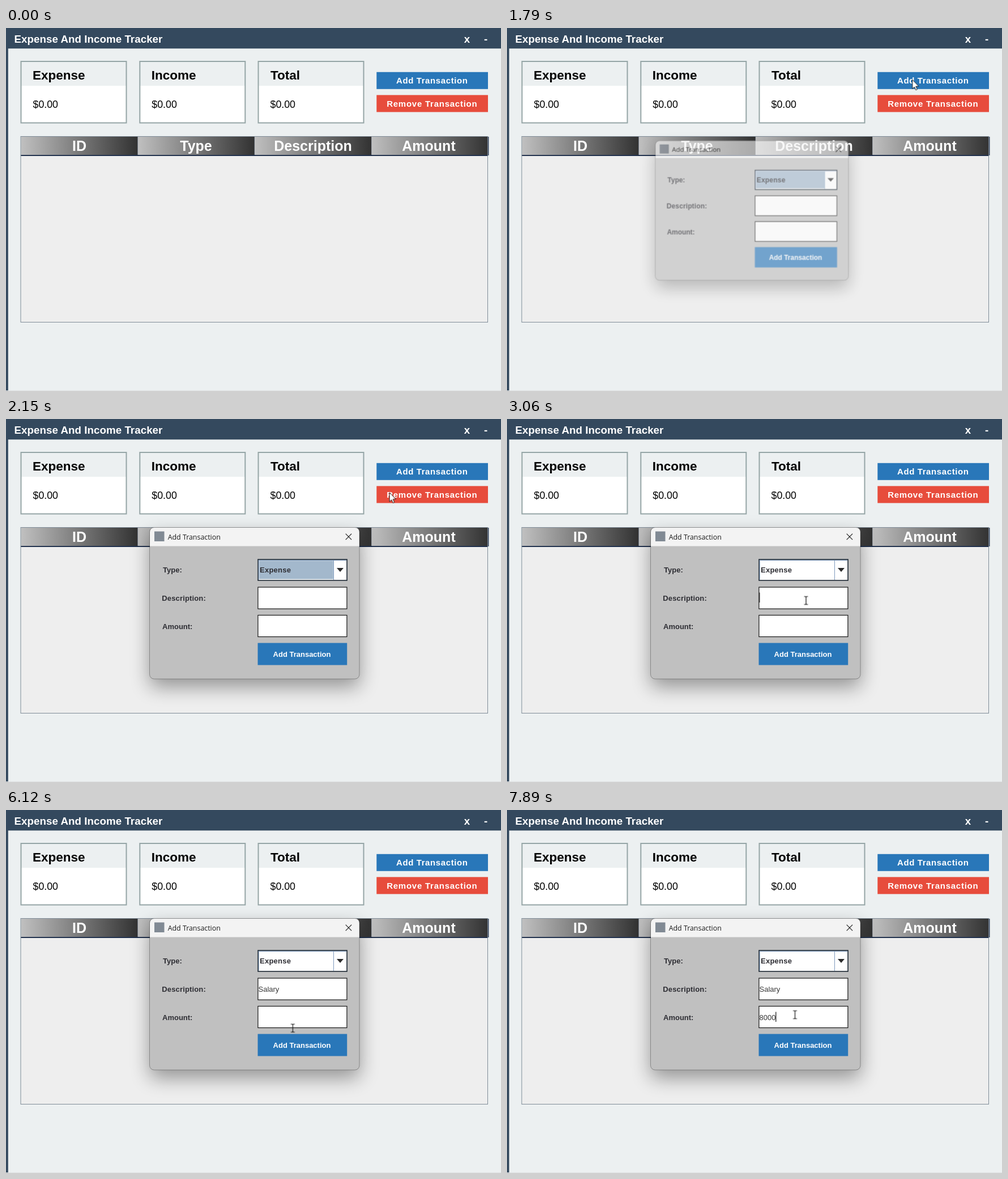
An HTML page that plays this animation: 874x641 px, repeating every 8 s.

```html
<!DOCTYPE html>
<html lang="en">
<head>
<meta charset="utf-8">
<title>Expense And Income Tracker</title>
<style>
html, body { margin: 0; width: 100%; height: 100%; overflow: hidden; background: #ecf0f1; }
svg { display: block; width: 874px; height: 641px; font-family: "Liberation Sans", Arial, sans-serif; }
text { white-space: pre; }
.bold { font-weight: bold; }
.mid { text-anchor: middle; }
.white { fill: #fff; }
.h1 { font-size: 18.75px; }
.h2 { font-size: 22.5px; }
.sum { font-size: 17.8px; }
.head { font-size: 25px; }
.btn { font-size: 15px; letter-spacing: .6px; }
.small { font-size: 13px; }
.label { fill: #2d2d33; }
.field { fill: #fff; stroke: #151515; stroke-width: 1.2; }
.typed { fill: #383838; }
.caret { fill: #222; }

/* every part shares one 8 s loop */
.loop { animation: 8s linear infinite; }
.step { animation: 8s step-end infinite; }

#dialog { animation-name: open; transform-origin: 357px 287px; }
#combo { animation-name: blur; }
#cursor { animation-name: move; }
#arrow { animation-name: arrow; }
#hand { animation-name: hand; }
#beam { animation-name: beam; }
#descClip { animation-name: typeDesc; }
#descCaret { animation-name: typeDesc, blinkDesc; }
#sumClip { animation-name: typeSum; }
#sumCaret { animation-name: typeSum, blinkSum; }

@keyframes open {
  0%, 21.1% { opacity: 0; transform: scale(.85); }
  23% { opacity: .93; transform: scale(.954); }
  24.9%, 100% { opacity: 1; transform: none; }
}
@keyframes blur {
  0% { fill: #a3b8cc; }
  36.75% { fill: #fff; }
}
@keyframes move {
  0%, 3.125% { transform: translate(838px, 611px); animation-timing-function: cubic-bezier(.3, .2, .4, 1); }
  9.25%, 11.6% { transform: translate(725px, 98px); }
  12.375%, 23.4% { transform: translate(715.5px, 91px); }
  26.875% { transform: translate(677.5px, 129px); }
  30%, 31% { transform: translate(516px, 256px); }
  32.375%, 36.7% { transform: translate(527px, 320.5px); }
  36.75%, 41.2% { transform: translate(528px, 320.5px); }
  41.25%, 76.35% { transform: translate(529.5px, 320.5px); }
  76.5% { transform: translate(506.5px, 385px); }
  79.1% { transform: translate(480px, 422px); }
  82%, 100% { transform: translate(508.5px, 361.5px); }
}
@keyframes arrow {
  0% { opacity: 0; }
  3.125% { opacity: 1; }
  8.4% { opacity: 0; }
  20.125% { opacity: 1; }
  31.8% { opacity: 0; }
  76.9% { opacity: 1; }
  80.9% { opacity: 0; }
}
@keyframes hand {
  0% { opacity: 0; }
  8.4% { opacity: 1; }
  20.125% { opacity: 0; }
}
@keyframes beam {
  0% { opacity: 0; }
  31.8% { opacity: 1; }
  76.9% { opacity: 0; }
  80.9% { opacity: 1; }
}
@keyframes typeDesc {
  0% { transform: none; }
  49.5% { transform: translateX(8.7px); }
  55.125% { transform: translateX(15.9px); }
  57% { transform: translateX(18.8px); }
  59.5% { transform: translateX(26px); }
  62% { transform: translateX(30.4px); }
  67.5% { transform: translateX(36.9px); }
}
@keyframes blinkDesc {
  0% { opacity: 0; }
  36.75% { opacity: 1; }
  43.125% { opacity: 0; }
  49.5% { opacity: 1; }
  73.5% { opacity: 0; }
  79.75% { opacity: 1; }
  84.5% { opacity: 0; }
}
@keyframes typeSum {
  0% { transform: none; }
  91.75% { transform: translateX(7.2px); }
  94.25% { transform: translateX(14.5px); }
  96.125% { transform: translateX(21.7px); }
  98.625% { transform: translateX(28.9px); }
}
@keyframes blinkSum {
  0% { opacity: 0; }
  84.5% { opacity: 1; }
  90.5% { opacity: 0; }
  91.75% { opacity: 1; }
}
</style>
</head>
<body>
<svg viewBox="0 0 874 641">
  <defs>
    <linearGradient id="steel">
      <stop offset="0" stop-color="#c0c0c0"/>
      <stop offset="1" stop-color="#323232"/>
    </linearGradient>
    <filter id="soft" x="-30%" y="-30%" width="160%" height="170%">
      <feGaussianBlur stdDeviation="17"/>
    </filter>
    <g id="card">
      <rect x="1" y="59" width="186" height="108.5" fill="#fff"/>
      <rect x="1" y="59" width="186" height="43" fill="#ecf0f1"/>
      <rect x="1" y="59" width="186" height="108.5" fill="none" stroke="#95a5a6" stroke-width="2"/>
    </g>
    <g id="cell">
      <rect y="192" width="206" height="32.5" fill="url(#steel)"/>
      <rect x="206" y="192" width="1.2" height="33" fill="#0f2140"/>
    </g>
    <clipPath id="descMask"><rect id="descClip" class="step" x="345.5" y="300" width="100" height="32"/></clipPath>
    <clipPath id="sumMask"><rect id="sumClip" class="step" x="345.5" y="350" width="100" height="32"/></clipPath>
  </defs>

  <!-- main window -->
  <rect width="874" height="641" fill="#ecf0f1"/>
  <rect y="640" width="874" height="1" fill="#dde0e1"/>
  <path d="M0 0H874V36.3H3.8V640H0Z" fill="#34495e"/>
  <g class="bold white h1">
    <text x="14.5" y="26" letter-spacing=".04">Expense And Income Tracker</text>
    <text x="808.7" y="26">x</text>
    <text x="844" y="26">-</text>
  </g>

  <use href="#card" x="25.5"/>
  <use href="#card" x="235.3"/>
  <use href="#card" x="444.5"/>
  <g class="bold h2">
    <text x="47" y="91">Expense</text>
    <text x="256.8" y="91">Income</text>
    <text x="467" y="91">Total</text>
  </g>
  <g class="sum">
    <text x="47.5" y="141">$0.00</text>
    <text x="257.3" y="141">$0.00</text>
    <text x="466.5" y="141">$0.00</text>
  </g>

  <rect x="654.3" y="77.8" width="196.7" height="30" fill="#2977b9"/>
  <rect x="654.3" y="118.4" width="196.7" height="30" fill="#e74c3c"/>
  <g class="bold white btn">
    <text x="689" y="98">Add Transaction</text>
    <text x="672.2" y="138.5" letter-spacing=".75" style="letter-spacing:.75px">Remove Transaction</text>
  </g>

  <!-- table -->
  <rect x="26" y="191.5" width="824.5" height="328" fill="#eee"/>
  <use href="#cell" x="26.5"/>
  <use href="#cell" x="232.7"/>
  <use href="#cell" x="439"/>
  <use href="#cell" x="645.2"/>
  <rect x="26" y="224.2" width="825" height="1.8" fill="#0f2140"/>
  <rect x="26" y="191.5" width="824.5" height="328" fill="none" stroke="#7f8b97"/>
  <g class="bold white mid head">
    <text x="129.5" y="216.5">ID</text>
    <text x="335.5" y="216.5">Type</text>
    <text x="542" y="216.5">Description</text>
    <text x="746.5" y="216.5">Amount</text>
  </g>

  <!-- dialog -->
  <g id="dialog" class="loop">
    <rect x="254" y="206" width="370" height="267" rx="8" opacity=".38" filter="url(#soft)"/>
    <rect x="254" y="191.5" width="370" height="267.5" rx="8" fill="#c0c0c0"/>
    <path d="M254 224.5V199.5a8 8 0 0 1 8-8H616a8 8 0 0 1 8 8V224.5Z" fill="#f3f3f3"/>
    <rect x="253.5" y="191.5" width="370.5" height="267.5" rx="8" fill="none" stroke="#000" stroke-opacity=".3"/>
    <rect x="262" y="198.5" width="17.5" height="17.5" fill="#818a94"/>
    <text x="285.7" y="213" fill="#1b1b1b" font-size="12.4" style="font-family:'Open Sans','Noto Sans',sans-serif">Add Transaction</text>
    <path d="M599.7 202.7l10.4 10.4m0-10.4l-10.4 10.4" stroke="#222" stroke-width="1.2"/>

    <g class="bold small label">
      <text x="277" y="271">Type:</text>
      <text x="275.3" y="321.3" letter-spacing=".15">Description:</text>
      <text x="276" y="370.7">Amount:</text>
    </g>

    <rect x="445" y="248" width="157" height="37" fill="#fff" stroke="#1b2631" stroke-width="1.6"/>
    <rect id="combo" class="step" x="447.3" y="250.3" width="130.5" height="32.4"/>
    <path d="M446.3 283.5V249.5H600.8M578.5 250V284" fill="none" stroke="#7f9bbd"/>
    <path d="M584 263H596L590 270Z" fill="#2b2b2b"/>
    <text class="bold small label" x="448" y="271" letter-spacing=".25">Expense</text>

    <rect class="field" x="444.9" y="297" width="157" height="38.2"/>
    <rect class="field" x="444.9" y="346.5" width="157" height="38"/>
    <g class="small typed">
      <g clip-path="url(#descMask)"><text x="445.5" y="321.3" style="font-kerning:none">Salary</text></g>
      <g clip-path="url(#sumMask)"><text x="445.5" y="370.7">8000</text></g>
    </g>
    <rect id="descCaret" class="caret step" x="445.2" y="306.5" width="1.3" height="17.5"/>
    <rect id="sumCaret" class="caret step" x="445.2" y="356.5" width="1.3" height="17.5"/>

    <rect x="444.5" y="395.5" width="157.7" height="39" fill="#2977b9"/>
    <text class="bold white mid small" x="522.5" y="420">Add Transaction</text>
  </g>

  <!-- pointer -->
  <g id="cursor" class="loop" stroke="#111" stroke-linejoin="round">
    <path id="arrow" class="step" fill="#fff" stroke-width=".9" d="M.3 .3V16.3L3.9 13 6.3 18.6 8.8 17.5 6.4 12H11.4Z"/>
    <path id="hand" class="step" fill="#fff" d="M-1.5 1.8Q-1.5 .3 .2 .3T2 1.8V7Q3.6 6.2 4.6 7.6Q6.3 7 7 8.4Q9 8 9 10V14Q9 16 7.5 18V20.5H-.5V18.5Q-3 16-4.8 12.5Q-5.2 10.5-3.5 11L-1.5 13Z"/>
    <path id="beam" class="step" fill="none" stroke-width="1.2" d="M-3.5-7H-1L0-6.3 1-7H3.5M0-6.3V6.3M-3.5 7H-1L0 6.3 1 7H3.5"/>
  </g>
</svg>
</body>
</html>
```
